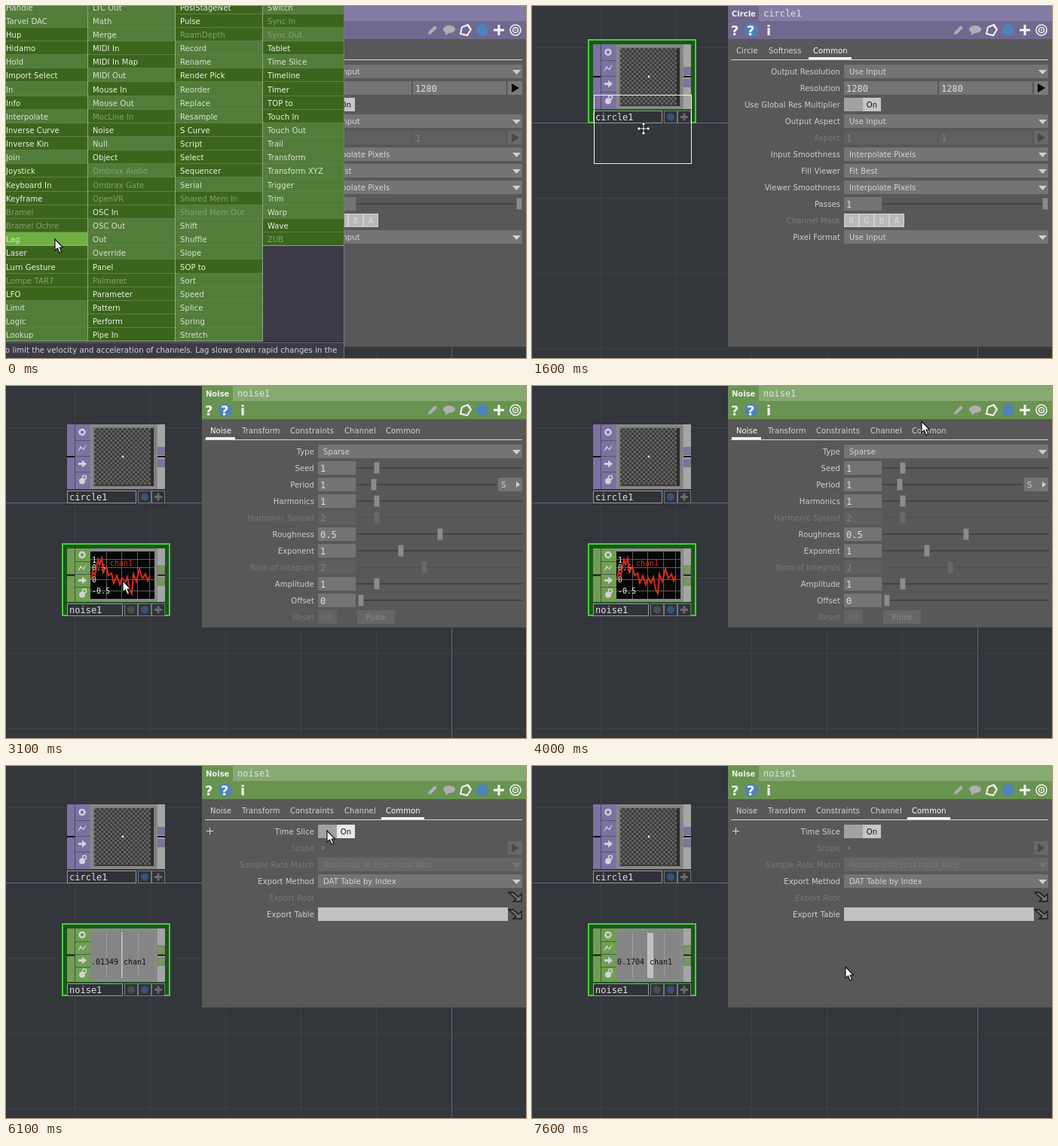
Animation, 690 px wide and 468 px high, one loop 7700 ms. Source, as an HTML page with a canvas:

```html
<!DOCTYPE html>
<html lang="en">
<head>
<meta charset="utf-8">
<title>Adding a noise operator</title>
<style>
html, body { margin: 0; width: 690px; height: 468px; overflow: hidden; background: #33363b; }
canvas { display: block; }
</style>
</head>
<body>
<canvas id="stage" width="690" height="468"></canvas>
<script>
const c = document.getElementById('stage').getContext('2d');
const LOOP = 7700, MENU_END = 1200, PLACED = 3000, COMMON = 4200, SLICED = 5400;
const SANS = '10px "DejaVu Sans", sans-serif';
const BOLD = 'bold 10px "DejaVu Sans", sans-serif';
const MONO = '12px "DejaVu Sans Mono", monospace';
const MONO_S = '10px "DejaVu Sans Mono", monospace';
const PURPLE = { title: '#857ca6', bar: '#71688f', node: '#7c71a3' };
const GREEN = { title: '#86aa72', bar: '#699350', node: '#6f9f50' };

// Operator lists: "+" marks a filter (lighter cell), "~" an unavailable entry.
const COLUMNS = [
  [0, 108, '+Handle,+Tarvel DAC,Hup,Hidamo,+Hold,Import Select,+In,Info,+Interpolate,Inverse Curve,Inverse Kin,+Join,Joystick,Keyboard In,Keyframe,~Bramel,~Bramel Ochre,+Lag,Laser,Lurn Gesture,~Lompe TAR7,LFO,+Limit,+Logic,+Lookup'],
  [109, 224, '+LTC Out,+Math,+Merge,MIDI In,MIDI In Map,+MIDI Out,Mouse In,+Mouse Out,~MocLine In,Noise,+Null,Object,+~Ombrax Audio,~Ombrax Gate,~OpenVR,OSC In,+OSC Out,+Out,+Override,Panel,~Palmeret,Parameter,Pattern,Perform,Pipe In'],
  [225, 340, 'PosiStageNet,Pulse,~RoamDepth,+Record,+Rename,Render Pick,+Reorder,+Replace,+Resample,S Curve,Script,Select,Sequencer,+Serial,~Shared Mem In,+~Shared Mem Out,+Shift,+Shuffle,+Slope,SOP to,+Sort,+Speed,+Splice,+Spring,+Stretch'],
  [341, 448, '+Switch,~Sync In,+~Sync Out,Tablet,+Time Slice,Timeline,Timer,TOP to,Touch In,+Touch Out,+Trail,+Transform,+Transform XYZ,+Trigger,+Trim,+Warp,Wave,~ZUB']
].map(([x, end, list]) => ({ x, end, items: list.split(',') }));

const HELP = {
  Lag: ['o limit the velocity and acceleration of channels. Lag slows down rapid changes in the'],
  Null: ['e data coming in. It is often used to Export channels to parameters, which allows you',
    'or fiddle with what comes before it without having to re-export from CHOP outputs to parameters.'],
  Noise: ['s an irregular wave that never repeats, with values approximately in the range -1 to +1.']
};

// Pointer path: time, x, y
const PATH = [[0, 65, 310], [800, 146, 170], [1000, 147, 165], [1600, 148, 163], [2400, 145, 265],
  [3000, 145, 265], [4000, 517, 47], [4200, 522, 55], [4500, 522, 56], [5200, 426, 86],
  [6200, 426, 86], [6900, 416, 267], [LOOP, 416, 267]];
const WAVE = [[113, 258], [115, 246], [118, 252], [122, 231], [124, 238], [127, 229], [129, 248],
  [133, 240], [136, 252], [140, 249], [143, 262], [147, 252], [151, 264], [154, 255], [158, 262],
  [161, 254], [164, 270], [167, 276], [169, 250], [173, 260], [177, 243], [181, 256], [185, 250],
  [188, 259], [191, 252]];

function pointer(t) {
  t = Math.max(0, t);
  const i = PATH.findIndex(p => p[0] > t), [t0, x0, y0] = PATH[i - 1], [t1, x1, y1] = PATH[i];
  let k = (t - t0) / (t1 - t0);
  if (i > 3) k = k * k * (3 - 2 * k);
  return [Math.round(x0 + (x1 - x0) * k), Math.round(y0 + (y1 - y0) * k)];
}

function box(x, y, w, h, fill) { c.fillStyle = fill; c.fillRect(x, y, w, h); }
function frame(x, y, w, h, stroke, width = 1) {
  c.strokeStyle = stroke; c.lineWidth = width;
  c.strokeRect(x + width / 2, y + width / 2, w - width, h - width);
}
function text(s, x, y, fill = '#d0d0d0', font = SANS, align = 'left') {
  c.font = font; c.fillStyle = fill; c.textAlign = align;
  c.letterSpacing = font === SANS ? '0.1px' : '0px';
  c.fillText(s, x, y + 4);
}
function poly(points, fill, stroke, width = 1) {
  c.beginPath();
  points.forEach(p => c.lineTo(...p));
  if (fill) { c.closePath(); c.fillStyle = fill; c.fill(); }
  if (stroke) { c.strokeStyle = stroke; c.lineWidth = width; c.stroke(); }
}
function disc(x, y, r, fill) { c.beginPath(); c.arc(x, y, r, 0, 7); c.fillStyle = fill; c.fill(); }
function ring(x, y, r, stroke, width) {
  c.beginPath(); c.arc(x, y, r, 0, 7); c.strokeStyle = stroke; c.lineWidth = width; c.stroke();
}
function plus(x, y, r, w, fill) { box(x - r, y - w / 2, 2 * r, w, fill); box(x - w / 2, y - r, w, 2 * r, fill); }
function clipped(x, y, w, h, draw) {
  c.save(); c.beginPath(); c.rect(x, y, w, h); c.clip(); draw(); c.restore();
}

function network() {
  box(0, 0, 690, 468, '#33363b');
  for (let x = 91; x < 690; x += 100) box(x, 0, 1, 468, x === 591 ? '#6a5f8c' : '#3d4045');
  for (let y = 55; y < 468; y += 100) box(0, y, 690, 1, y === 155 ? '#666a7c' : '#3d4045');
}

function nodeIcons(top, step) {
  const ink = '#d2d2d8', x = 101, y = i => top + step * (i + .5);
  for (let i = 1; i < 4; i++) box(92, top + i * step, 20, 1, '#55555c');
  ring(x, y(0), 3.5, ink, 2.5);
  poly([[x - 6, y(1) + 5], [x - 2, y(1) - 3], [x + 1, y(1) + 1], [x + 6, y(1) - 5],
    [x + 2, y(1) + 3], [x - 1, y(1)]], ink);
  poly([[x - 5, y(2) - 1.5], [x, y(2) - 1.5], [x, y(2) - 5], [x + 6, y(2)], [x, y(2) + 5],
    [x, y(2) + 1.5], [x - 5, y(2) + 1.5]], ink);
  disc(x, y(3) + 2, 4, ink);
  ring(x + 3, y(3) - 3, 2.5, ink, 1.5);
}

function node(name, top, height, step, skin, selected, flags, viewer) {
  const end = top + height, mid = top + height / 2;
  if (selected) {
    box(74, top - 7, 144, height + 26, '#1c561d');
    frame(74, top - 7, 144, height + 26, '#48cc3a', 2);
  }
  box(81, top, 130, height, '#898989');
  box(81, top, 31, height, skin.node);
  box(91, top, 1, height, '#4b4b52');
  nodeIcons(top, step);
  viewer();
  box(201, top, 10, height, '#a5a5a5');
  box(81, mid - 1, 10, 2, '#111');
  box(201, mid - 1, 10, 2, '#111');
  for (const y of [mid - 13, mid + 3]) {
    box(201, y, 10, 11, '#77777c');
    box(202, y + 1, 8, 9, skin.node);
  }
  const bar = end + 2, nameEnd = 211 - 18 * flags - 2;
  box(81, bar, 130, 17, '#303238');
  frame(81, bar, nameEnd - 81, 17, '#9a9a9a');
  text(name, 84, bar + 9, '#e0e0e0', MONO);
  for (let i = 0; i < flags; i++) {
    const x = 211 - 18 * (flags - i);
    frame(x, bar, 18, 17, '#74767a');
    if (i === flags - 1) plus(x + 9, bar + 8.5, 5, 3, '#686a6d');
    else disc(x + 9, bar + 8.5, 5, i === flags - 2 ? '#34537d' : '#4b4f4b');
  }
}

function circleViewer() {
  box(115, 54, 84, 80, '#7c7c7c');
  box(117, 56, 79, 77, '#3c3c3c');
  for (let y = 0; y < 25; y++)
    for (let x = y % 2; x < 25; x += 2) box(117 + x * 3, 56 + y * 3, 3, 3, '#616161');
  box(192, 56, 4, 77, '#2c2c2c');
  disc(155, 94, 1.4, '#fff');
}

function level(t) {
  const k = (t - 6100) / 1500;
  return .01349 + .15691 * k + .32 * Math.sin(2 * Math.PI * k) - .13 * Math.sin(8 * Math.PI * k);
}

function noiseViewer(t) {
  const sliced = t >= SLICED;
  clipped(112, 220, 85, 63, () => {
    box(112, 220, 85, 63, sliced ? '#858585' : '#050505');
    if (sliced) {
      for (const x of [133, 175]) box(x, 221, 1, 61, '#a0a0a0');
      box(153, 221, 1, 61, '#c6c6c6');
      const w = level(t) * 42;
      box(w < 0 ? 154 + w : 154, 222, Math.abs(w), 60, '#c0c0c0');
      text(level(t).toPrecision(4), 149, 260, '#111', MONO_S, 'right');
      text('chan1', 156, 260, '#111', MONO_S);
      return;
    }
    for (const x of [133, 153, 174, 190]) box(x, 220, 1, 63, '#5c5c5c');
    for (const y of [230, 241, 257, 272]) box(112, y, 85, 1, '#5c5c5c');
    [['1', 231], ['0.5', 241], ['0', 257], ['-0.5', 272]].forEach(([s, y]) => text(s, 114, y, '#eee', MONO_S));
    poly(WAVE, null, '#d92b1c', 2);
    text('chan1', 138, 235, '#d92b1c', MONO_S);
  });
}

function header(skin, type, name, tabs, active, height) {
  box(260, 0, 430, height, '#585858');
  box(260, 0, 430, 20, skin.title);
  box(260, 0, 41, 20, skin.bar);
  box(260, 20, 430, 24, skin.bar);
  text(type, 265, 10, '#f0f0f0', BOLD);
  text(name, 307, 10, '#e4e4e4', MONO);
  const big = 'bold 18px "DejaVu Sans", sans-serif';
  text('?', 264, 35, '#f4f4f4', big);
  disc(291, 32, 9, '#4d83b8');
  text('?', 285, 35, '#f4f4f4', big);
  text('i', 311, 35, '#f4f4f4', big);
  poly([[560, 38], [561, 34], [569, 26], [572, 29], [564, 37]], '#b0adb5');
  c.beginPath(); c.ellipse(588, 31, 8, 5, 0, 0, 7); c.fillStyle = '#b0adb5'; c.fill();
  poly([[583, 34], [583, 39], [589, 35]], '#b0adb5');
  poly([[605, 28], [613, 25], [617, 31], [612, 39], [603, 37], [605, 28]], null, '#f2f2f2', 2);
  poly([[611, 25], [616, 27], [615, 31]], '#f2f2f2');
  disc(632, 32, 8, '#4d83b8');
  plus(654, 32, 7, 3, '#f6f6f6');
  ring(676, 32, 7, '#f2f2f2', 1.6);
  ring(676, 32, 3.5, '#f2f2f2', 1.6);
  disc(676, 32, 1, '#f2f2f2');
  box(264, 71, 421, 1, '#d8d8d8');
  tabs.forEach(([s, x, w]) => {
    text(s, x, 59, s === active ? '#fff' : '#d6d6d6');
    if (s === active) box(x - 6, 68, w + 12, 3, '#f2f2f2');
  });
}

const rowY = i => 87 + 22 * i;
const label = (i, s, off) => text(s, 409, rowY(i), off ? '#7a7a7a' : '#d0d0d0', SANS, 'right');
function field(i, s, x = 414, w = 50, off = false) {
  box(x, rowY(i) - 9, w, 18, off ? '#5f5f5f' : '#747474');
  text(s, x + 3, rowY(i) + 1, off ? '#828282' : '#e0e0e0', MONO);
}
function choice(i, name, s, off) {
  const y = rowY(i);
  label(i, name, off);
  box(414, y - 9, 271, 18, off ? '#666' : '#747474');
  text(s, 421, y, off ? '#777' : '#d6d6d6');
  poly([[672, y - 2], [683, y - 2], [677.5, y + 4]], off ? '#777' : '#d0d0d0');
}
function slider(i, name, value, x, off, end = 686) {
  const y = rowY(i);
  label(i, name, off);
  field(i, value, 414, 50, off);
  box(466, y - 1, end - 466, 2, off ? '#525252' : '#434343');
  box(x - 4, y - 8, 8, 16, off ? '#686868' : '#8c8c8c');
  frame(x - 4, y - 8, 8, 16, off ? '#606060' : '#6c6c6c');
}
function play(i, off) {
  const y = rowY(i);
  box(666, y - 9, 19, 18, off ? '#686868' : '#7a7a7a');
  poly([[671, y - 6], [681, y], [671, y + 6]], off ? '#484848' : '#000');
}
function toggle(i, on, hover) {
  const y = rowY(i) - 9, lit = hover ? '#e9e9e9' : '#c6c6c6';
  box(414, y, 49, 18, '#a2a2a2');
  box(on ? 439 : 414, y, 24, 18, lit);
  text(on ? 'On' : 'Off', on ? 451 : 426, y + 9, '#111', SANS, 'center');
}
function exportArrow(y) {
  poly([[667, y - 6], [673, y - 6], [680, y], [684, y - 4], [684, y + 6], [673, y + 6], [677, y + 3], [667, y - 6]],
    '#707070', '#161616', 1.3);
}

function circlePanel() {
  header(PURPLE, 'Circle', 'circle1', [['Circle', 271, 28], ['Softness', 314, 43], ['Common', 373, 45]], 'Common', 453);
  choice(0, 'Output Resolution', 'Use Input');
  label(1, 'Resolution');
  field(1, '1280', 414, 124); field(1, '1280', 540, 124); play(1);
  label(2, 'Use Global Res Multiplier');
  toggle(2, true);
  choice(3, 'Output Aspect', 'Use Input');
  label(4, 'Aspect', true);
  field(4, '1', 414, 124, true); field(4, '1', 540, 124, true); play(4, true);
  choice(5, 'Input Smoothness', 'Interpolate Pixels');
  choice(6, 'Fill Viewer', 'Fit Best');
  choice(7, 'Viewer Smoothness', 'Interpolate Pixels');
  slider(8, 'Passes', '1', 681);
  label(9, 'Channel Mask', true);
  [...'RGBA'].forEach((s, i) => {
    const x = 414 + 20 * i;
    box(x, 276, 20, 18, '#b9b9b9');
    frame(x, 276, 20, 18, '#d2d2d2');
    text(s, x + 10, 285, '#dedede', SANS, 'center');
  });
  choice(10, 'Pixel Format', 'Use Input');
}

function noisePanel(t, [px, py]) {
  const page = t < COMMON ? 'Noise' : 'Common';
  header(GREEN, 'Noise', 'noise1', [['Noise', 271, 27], ['Transform', 313, 49], ['Constraints', 377, 56],
    ['Channel', 449, 40], ['Common', 504, 45]], page, 321);
  if (page === 'Noise') {
    choice(0, 'Type', 'Sparse');
    slider(1, 'Seed', '1', 492);
    slider(2, 'Period', '1', 488, false, 650);
    box(653, 122, 32, 18, '#747474');
    text('S', 657, 131);
    poly([[677, 127], [682, 131], [677, 135]], '#d0d0d0');
    slider(3, 'Harmonics', '1', 492);
    slider(4, 'Harmonic Spread', '2', 492, true);
    slider(5, 'Roughness', '0.5', 576);
    slider(6, 'Exponent', '1', 524);
    slider(7, 'Num of Integrals', '2', 555, true);
    slider(8, 'Amplitude', '1', 492);
    slider(9, 'Offset', '0', 471);
    label(10, 'Reset', true);
    box(414, 298, 25, 18, '#636363');
    text('Off', 426, 307, '#727272', SANS, 'center');
    box(466, 298, 50, 18, '#666');
    text('Pulse', 491, 307, '#8a8a8a', SANS, 'center');
    return;
  }
  plus(270.5, 86.5, 4.5, 1, '#ddd');
  label(0, 'Time Slice');
  toggle(0, t >= SLICED, px > 413 && px < 464 && py > 77 && py < 96);
  label(1, 'Scope', true);
  text('*', 417, 111, '#828282', MONO);
  play(1, true);
  choice(2, 'Sample Rate Match', 'Resample At First Input Rate', true);
  choice(3, 'Export Method', 'DAT Table by Index');
  label(4, 'Export Root', true);
  exportArrow(174);
  label(5, 'Export Table');
  box(414, 188, 252, 18, '#c1c1c1');
  exportArrow(197);
}

function menu([px, py]) {
  box(0, 0, 449, 468, '#3c3a46');
  const edge = i => Math.round(-7.5 + 18.15 * i);
  let hovered = '';
  for (const { x, end, items } of COLUMNS) {
    items.forEach((item, i) => {
      const y = edge(i), h = edge(i + 1) - y, name = item.replace(/[+~]/g, '');
      const hot = px >= x && px <= end && py >= y && py < y + h;
      const light = item.includes('+'), off = item.includes('~');
      if (hot) hovered = name;
      box(x, y, end - x, h, hot ? '#70b043' : light ? '#527c3a' : '#3b651c');
      box(x, y + h - 1, end - x, 1, hot ? '#84bd5c' : '#5d8145');
      text(name, x ? x + 6 : 0, y + h / 2, off ? '#86a175' : light ? '#dbe6d4' : '#eef2ea');
    });
    box(end, 0, 1, edge(items.length), '#8fa882');
    box(x, edge(items.length) - 1, end - x, 1, '#8fa882');
  }
  box(0, 446, 449, 1, '#282733');
  box(0, 447, 449, 1, '#6c6a78');
  box(448, 0, 1, 468, '#77758a');
  const help = HELP[hovered] || [`e ${hovered} CHOP works on the channels of its input and passes on the result.`];
  clipped(0, 448, 447, 20, () => help.forEach((s, i) => text(s, -1, 457 + 14 * i, '#d4d4da')));
}

function arrow(x, y) {
  poly([[0, 0], [0, 15], [3.5, 12], [6, 18], [8.6, 17], [6.2, 11], [10.5, 11]].map(([a, b]) => [x + a, y + b]),
    '#fff', '#111', 1.2);
}
function moveCursor(x, y) {
  const arm = [[-1, -1], [-1, -5], [-3.5, -5], [0, -9], [3.5, -5], [1, -5]];
  const turn = ([a, b], n) => n ? turn([-b, a], n - 1) : [x + a, y + b];
  poly([0, 1, 2, 3].flatMap(n => arm.map(p => turn(p, n))), '#fff', '#111', 1);
}

function draw(t) {
  const pos = pointer(t), placed = t >= PLACED;
  network();
  node('circle1', 51, 86, 21, PURPLE, !placed, 2, circleViewer);
  if (placed) {
    node('noise1', 216, 71, 17, GREEN, true, 3, () => noiseViewer(t));
    noisePanel(t, pos);
  } else circlePanel();
  if (t < MENU_END) menu(pointer(t - 100));
  else if (!placed) frame(pos[0] - 66, pos[1] - 45, 130, 92, '#f0f0f0');
  if (t >= MENU_END && t < 2500) moveCursor(...pos);
  else arrow(...pos);
}

function tick() {
  draw(Math.floor(performance.now() % LOOP / 100) * 100);
  requestAnimationFrame(tick);
}
tick();
</script>
</body>
</html>
```
